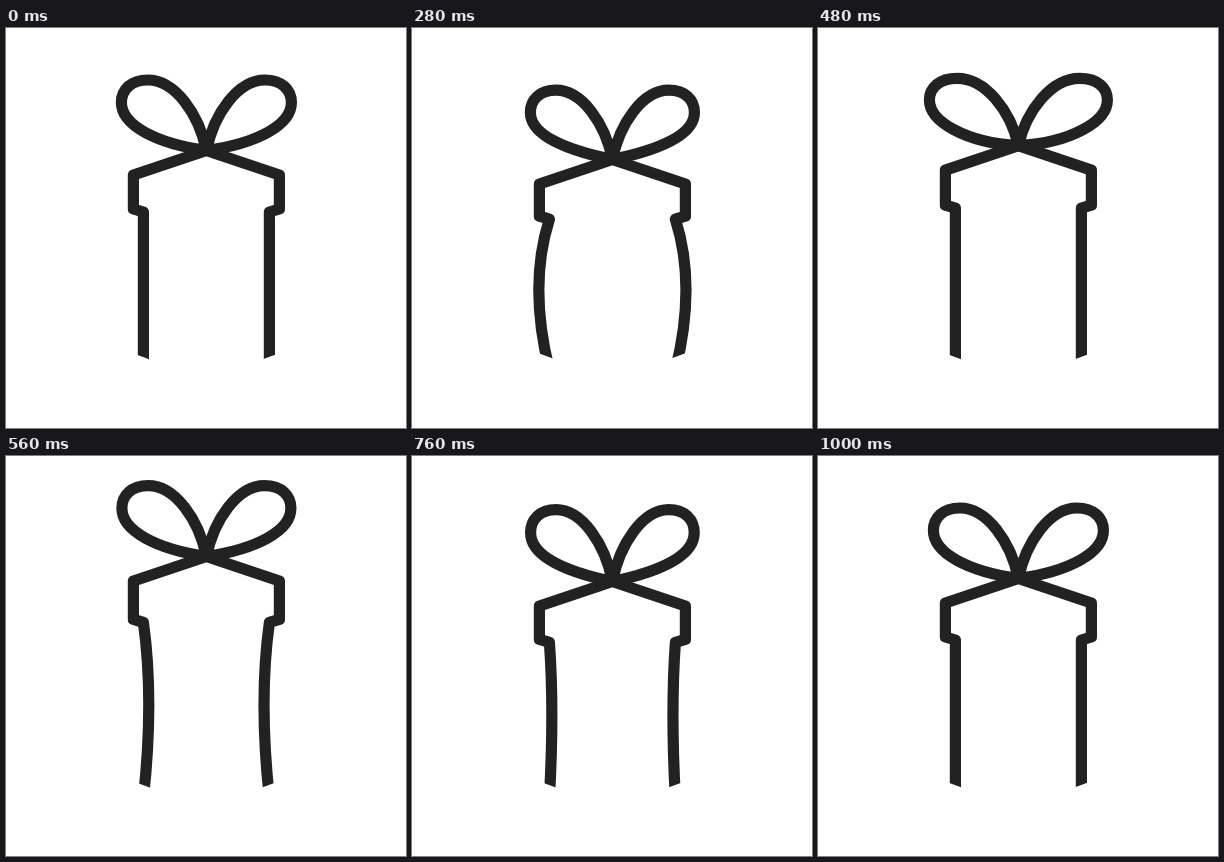
Animation of 400x400 px, one loop 1.08 s. Source, as an HTML page:

```html
<!DOCTYPE html>
<html lang="en">
<head>
<meta charset="utf-8">
<title>Bouncing gift</title>
<style>
  html, body { margin: 0; width: 100%; height: 100%; overflow: hidden; background: #fff; }
  svg { display: block; width: 100%; height: 100%; }
  path { fill: none; stroke: #222; stroke-width: 11.2; stroke-linejoin: round; }
</style>
</head>
<body>
<svg viewBox="0 0 400 400">
  <clipPath id="floor"><polygon points="0,0 400,0 400,279 200,352 0,279"/></clipPath>
  <g clip-path="url(#floor)">
    <path id="box"/>
    <path id="bow"/>
  </g>
</svg>
<script>
const LOOP = 1080, STEP = 40, LAST = 1000, MID = 200.4;

const easeIn = n => u => u ** n;
const easeOut = n => u => 1 - (1 - u) ** n;
const smooth = u => (1 - Math.cos(Math.PI * u)) / 2;

// Each phase leads to a pose: drop of the lid, inward bend of the sides and
// spread of the bow; swing is an extra spread halfway through.
const REST = { end: 0, drop: 0, bend: 0, spread: 0 };
const PHASES = [
  { end: 280, drop: 9, bend: -10.8, spread: -3, swing: -2.9, ease: easeOut(1.4) },
  { end: 560, drop: -22, bend: 5.5, spread: -0.5, swing: 7.5, ease: easeIn(2.4) },
  { end: 760, drop: 3, bend: 2.5, spread: -3.2, swing: -1, ease: easeOut(2) },
  { ...REST, end: LAST, swing: 0, ease: smooth }
];

const mix = (a, b, f) => a + (b - a) * f;

function poseAt(t) {
  const i = PHASES.findIndex(p => t <= p.end);
  const to = PHASES[i], from = PHASES[i - 1] || REST;
  const u = (t - from.end) / (to.end - from.end), f = to.ease(u);
  return {
    drop: mix(from.drop, to.drop, f),
    bend: mix(from.bend, to.bend, Math.sqrt(f)),
    spread: mix(from.spread, to.spread, f) + to.swing * Math.sin(Math.PI * u)
  };
}

function boxSide({ drop, bend }, dir) {
  const x = d => MID + dir * d;
  const lid = 147 + drop, foot = lid + 34 - drop * 0.2;
  const top = foot + 3, end = 342, mid = 63 - bend * 4 / 3;
  const y = f => mix(top, end, f);
  return `M${MID},${lid - 24.5}L${x(73)},${lid}V${foot}L${x(63)},${top}` +
    `C${x(mid)},${y(0.3)} ${x(mid)},${y(0.62)} ${x(63)},${end}`;
}

// A wider loop is also lower, and its underside flatter.
function bowLoop({ drop, spread }, dir) {
  const knot = 122.5 + drop, w = 85 + spread;
  const h = 70.5 - 0.8 * spread - 0.4 * Math.max(0, drop);
  const x = f => MID + dir * w * f, y = f => knot - h * (1 - f);
  return `M${MID},${knot}C${x(0.088)},${y(0.48)} ${x(0.37)},${y(0)} ${x(0.688)},${y(0)}` +
    `C${x(0.888)},${y(0)} ${x(1)},${y(0.14)} ${x(1)},${y(0.32)}` +
    `C${x(1)},${y(0.64)} ${x(0.594)},${knot - 7 + spread} ${MID},${knot}`;
}

const box = document.getElementById("box");
const bow = document.getElementById("bow");

function render(now) {
  const t = Math.min(LAST, Math.floor((now % LOOP) / STEP) * STEP);
  const pose = poseAt(t);
  const both = side => side(pose, -1) + side(pose, 1);
  box.setAttribute("d", both(boxSide));
  bow.setAttribute("d", both(bowLoop));
}

const start = performance.now();
function tick() {
  render(performance.now() - start);
  requestAnimationFrame(tick);
}
tick();
</script>
</body>
</html>
```
